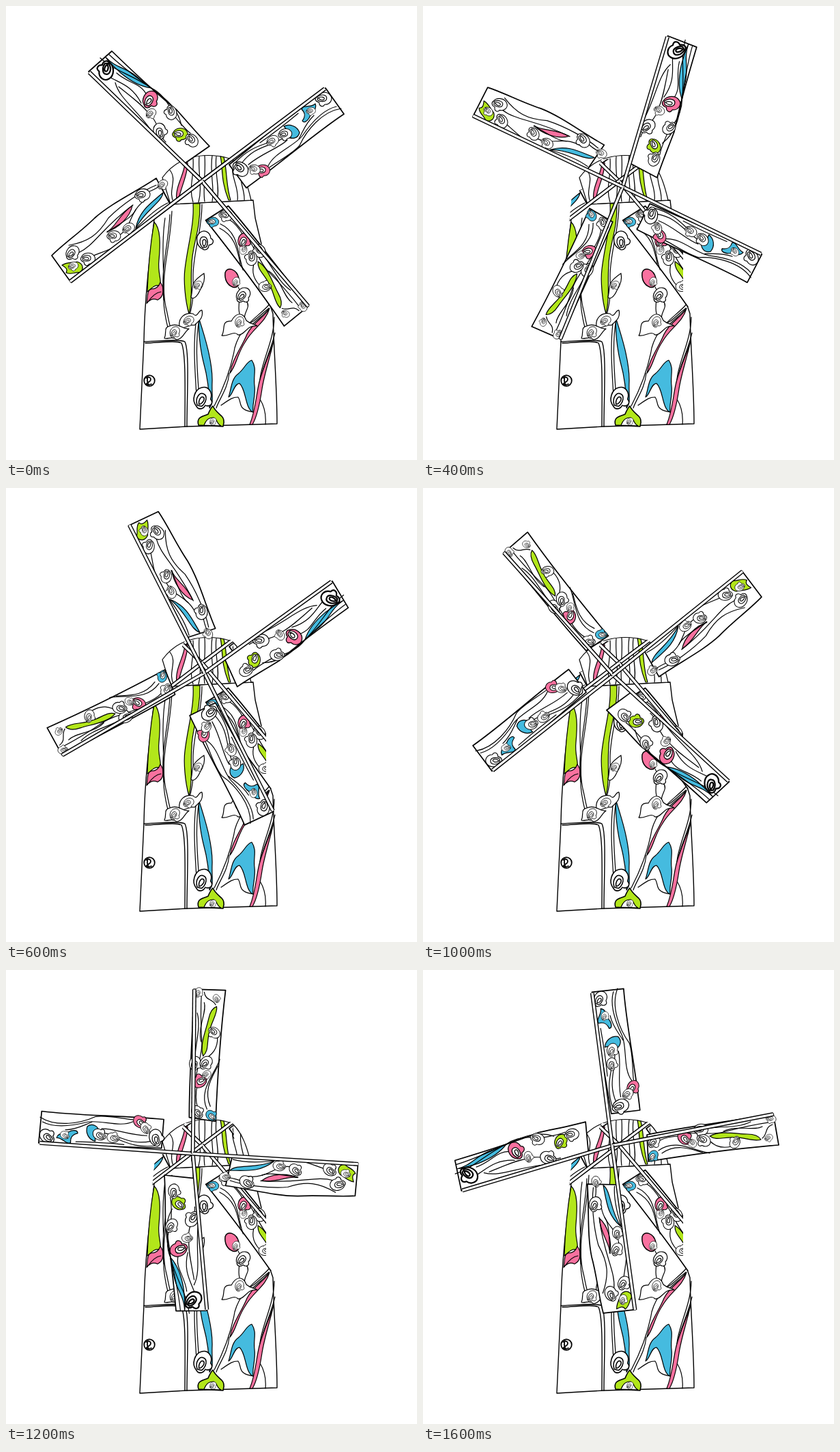
Write an HTML page that moves like this. It is 602 px wide and 664 px high and loops after 1800 ms.

```html
<!DOCTYPE html>
<html lang="en">
<head>
<meta charset="utf-8">
<title>Windmill</title>
<style>
html, body { margin: 0; width: 100%; height: 100%; overflow: hidden; background: #fff; }
svg { display: block; width: 602px; height: 664px; }
</style>
</head>
<body>
<svg id="stage" viewBox="0 0 602 664" stroke="#000" stroke-linecap="round" stroke-linejoin="round"></svg>
<script>
const GREEN = '#b2e61a', PINK = '#f8719f', BLUE = '#45bbdf', WHITE = '#fff';
const PIVOT = '282.7 264.8';
const STEP = 200;
const ANGLES = [0, 31, 62.7, 100.4, 139.5, 178.6, 220.9, 263.1, 299.4];

const shape = (d, fill = 'none', width = 1.2) =>
  `<path d="${d}" fill="${fill}" stroke-width="${width}"/>`;
const lines = (...paths) => paths.map(d => shape(d)).join('');

// A lily-like bloom: outer petal, white throat, small inner curl.
const bloom = (x, y, turn, size = 1, fill = WHITE, width = 1.2) =>
  `<g transform="translate(${x} ${y}) rotate(${turn}) scale(${size})">` +
  shape('M-7 8C-13 1-9-11-1-13C6-15 12-8 9 0C13 5 8 9 3 7C0 12-5 12-7 8Z', fill, width) +
  shape('M-6 7C-9-2-3-8 1-6C6-4 4 4-1 8Z', WHITE, width) +
  shape('M-4 6C-5 0-1-4 1-2S0 5-4 6', 'none', width) + '</g>';
const blooms = (...list) => list.map(args => bloom(...args)).join('');

const spar = (tip, hub) =>
  `<path d="M${tip}L${hub}" stroke-width="6" stroke-linecap="butt"/>` +
  `<path d="M${tip}L${hub}" stroke="#fff" stroke-width="3.2" stroke-linecap="butt"/>`;
const sail = (outline, tip, art, hub = '287 256') =>
  shape(outline, WHITE, 1.7) + art + spar(tip, hub);

const sailA = sail('M121 96L155 66C185 95 220 128 250 152C268 172 283 190 298 205L262 230C215 182 165 140 121 96Z', '122 97',
  shape('M146 75C160 90 175 90 190 102C202 112 207 116 213 120C195 118 180 108 168 98C160 90 152 84 146 75Z', BLUE) +
  lines('M138 76C160 96 180 98 213 120C225 126 235 138 241 150',
    'M152 104C165 112 185 116 198 142', 'M162 98C180 114 197 112 206 130',
    'M160 112C166 135 190 150 212 181', 'M165 118C185 134 200 145 208 156',
    'M215 122C235 136 252 150 257 175', 'M216 165C226 180 224 190 234 199',
    'M246 160C254 170 262 180 270 186', 'M151 71C175 94 200 110 220 126') +
  blooms([146, 93, 165, 1.1, WHITE, 2], [211, 138, 10, 1.05, PINK], [212, 158, 30, .65],
    [226, 184, -30, .95], [241, 155, 150, .85], [254, 188, 70, .9, GREEN], [271, 196, 120, .85]));

const sailB = sail('M468 120L495 158C450 188 405 228 352 266L327 232C372 196 420 155 468 120Z', '467 121',
  lines('M491 150C463 154 440 182 430 204C420 216 400 226 386 236',
    'M484 147C462 152 445 174 434 190C422 205 392 215 384 234',
    'M451 160C438 172 434 186 429 194', 'M408 192C385 207 365 204 345 230',
    'M398 194C380 204 360 202 334 231', 'M412 196C400 208 375 215 355 232',
    'M428 157C410 172 395 184 372 200', 'M455 130C462 124 468 130 470 138') +
  shape('M433 151C435 144 447 149 453 143C457 151 446 157 444 164C440 170 436 171 434 168C440 160 437 155 433 151Z', BLUE) +
  shape('M407 176C415 172 426 175 430 185C428 194 418 196 411 190C414 184 411 180 407 176Z', BLUE) +
  blooms([464, 136, 70, .95], [446, 154, 60, .55], [408, 188, 60, .8], [390, 198, 40, .75],
    [375, 241, 70, .85, PINK], [363, 239, 90, .7], [342, 238, 110, 1]));

// Drawn in its level pose, then turned to the rest pose.
const sailC = `<g transform="rotate(60.6 ${PIVOT})">` +
  sail('M513 210L521 256C460 261 405 268 330 280L328 241C390 228 450 222 513 210Z', '513 211',
    shape('M420 243C435 234 460 240 475 240C485 240 492 243 495 248C485 252 470 244 455 245C440 244 430 250 420 243Z', GREEN) +
    lines('M345 264C370 246 395 264 420 268', 'M350 268C372 253 392 262 410 267',
      'M349 245C380 233 420 243 440 237C470 229 490 225 512 222',
      'M412 242C425 257 435 262 452 258', 'M440 236C460 226 485 236 497 229',
      'M415 232C435 228 460 232 480 222', 'M497 246C505 240 500 230 512 226',
      'M345 250C352 246 365 243 378 243') +
    blooms([509, 218, 80, .6], [506, 246, 40, .5], [457, 251, 190, .75], [406, 234, 70, .85],
      [410, 249, 100, .85], [384, 246, -60, .9, PINK], [394, 253, 120, .55],
      [338, 252, 20, .8], [337, 273, 10, .7, BLUE]), '277 256.8') + '</g>';

const sailD = sail('M67 365L95 404C140 370 190 328 241 291L220 252C190 272 155 288 130 310C110 330 85 347 67 365Z', '94 403',
  shape('M148 330C160 325 165 305 185 292C182 308 165 325 148 330Z', PINK) +
  shape('M190 325C195 300 210 290 230 273C228 288 205 297 190 325Z', BLUE) +
  shape('M82 379C90 374 98 376 104 374C112 376 115 383 109 390C102 388 96 394 88 390C91 385 87 382 82 379Z', GREEN) +
  lines('M92 350C120 345 135 335 150 310C170 290 200 270 220 262',
    'M106 361C130 350 140 325 186 291', 'M112 372C140 358 170 355 189 328',
    'M168 334C185 322 180 300 205 283', 'M148 331C160 322 185 310 190 298',
    'M208 272C220 268 226 262 231 260', 'M190 326C205 310 220 296 237 288') +
  blooms([97, 362, 20, .9], [119, 370, 70, .85], [98, 381, 50, .6], [157, 337, 70, .8],
    [179, 326, 40, .75], [199, 277, 60, .9], [229, 262, 30, .65]));

const sails = sailA + sailB + sailC + sailD;

const cap =
  shape('M241 290L229 251C240 236 255 226 270 222C290 216 320 218 333 226C346 239 353 258 359 284Z', WHITE) +
  shape('M250 283C247 265 262 245 262 229L266 229C267 245 256 265 253 283Z', PINK) +
  shape('M314 220C318 235 314 255 326 284L329 284C322 262 324 240 319 221Z', GREEN) +
  lines('M240 240C252 255 236 270 246 288', 'M274 223C276 250 267 265 274 287', 'M283 220C281 245 288 265 282 287',
    'M291 219C293 245 288 265 291 286', 'M302 219C298 245 306 265 302 286',
    'M308 220C305 245 314 265 309 285', 'M333 227C327 248 342 265 339 284', 'M344 240C341 258 350 268 349 284');

const tower =
  shape('M217 313C210 370 203 430 202 490L196 619L265 615L397 611C397 560 392 500 391 450L385 432M240 290L362 284L365 310L374 348', 'none', 1.4) +
  shape('M217 316C227 325 226 350 224 372C222 390 228 400 226 410C218 405 212 415 207 418C208 385 212 345 217 316Z', GREEN) +
  shape('M226 404C232 412 232 425 222 430C214 426 208 432 206 435C208 425 206 415 213 414C220 414 224 410 226 404Z', PINK) +
  shape('M274 289L284 289C285 330 272 350 272 380C270 400 274 430 268 450C262 430 260 400 262 385C266 350 276 320 274 289Z', GREEN) +
  lines('M233 310C227 350 232 390 231 430C231 450 237 470 240 482',
    'M243 300C240 360 225 395 234 440C238 455 238 465 243 475',
    'M240 305C238 350 226 385 231 430M207 434C213 425 220 419 227 418',
    'M287 290C287 330 274 360 274 395C274 415 276 425 269 452',
    'M283 458C277 490 280 530 282 560', 'M278 465C274 500 277 535 279 570',
    'M386 436C370 455 345 465 335 500C330 530 318 560 305 585',
    'M327 537C325 560 312 575 308 588', 'M384 444C377 453 366 459 358 469',
    'M393 455C392 500 365 530 372 575C380 588 381 600 380 612',
    'M394 478C388 505 374 530 372 550', 'M340 411C347 420 338 435 342 450',
    'M352 432C360 440 346 450 350 458', 'M315 584C328 575 332 572 340 572C346 580 338 590 362 594',
    'M385 442C372 452 362 464 350 467') +
  shape('M283 458C290 480 303 520 302 550C301 570 305 580 298 588C298 570 296 545 289 520C284 500 281 470 283 458Z', BLUE) +
  shape('M326 572C330 560 330 545 340 538C350 530 352 520 360 518C368 530 362 540 364 555C366 570 360 585 362 594C350 590 352 560 342 552C334 552 332 570 326 572Z', BLUE) +
  shape('M386 442C380 454 362 462 353 480C345 500 332 515 328 537C338 525 338 510 350 492C362 470 380 464 386 442Z', PINK) +
  shape('M392 490C385 520 378 540 375 560C372 580 368 600 361 612L357 612C366 590 366 570 371 550C378 525 386 510 392 490Z', PINK) +
  shape('M321 390C324 380 338 385 341 398C344 408 338 413 332 411C324 408 320 400 321 390Z', PINK, 1.5) +
  shape('M316 482C322 474 314 460 330 461C338 446 348 449 352 460C360 467 364 464 368 468C352 466 350 482 340 481C334 474 325 484 316 482Z', WHITE) +
  shape('M271 426C275 410 268 406 290 391C292 400 288 410 284 416C280 425 274 430 271 426Z', WHITE) +
  shape('M254 470C252 455 262 448 274 450C280 458 282 444 287 445C290 458 280 462 276 467C268 464 262 474 254 470Z', WHITE) +
  shape('M232 486C236 478 230 470 240 468C252 462 260 474 268 472C260 478 260 486 250 488C242 482 238 488 232 486Z', WHITE) +
  blooms([337, 404, 0, .55], [347, 424, 20, .95], [342, 463, 0, .65], [281, 409, 25, .55],
    [291, 344, -25, 1.1], [267, 461, 40, .65], [247, 478, 10, .7], [288, 575, 0, 1.3]) +
  shape('M282 613C278 600 290 600 296 597C298 592 300 588 303 585C306 592 312 596 316 600C322 606 318 612 318 615Z', GREEN, 1.6) +
  shape('M290 613C293 606 296 602 304 602C310 604 308 611 315 614Z', WHITE) + bloom(303, 608, 20, .45) +
  shape('M202 491C225 490 255 487 262 491C269 505 265 570 265 615M204 493C228 492 250 489 257 493C264 508 262 570 262 615', 'none', 1.4) +
  '<circle cx="210" cy="548" r="7.8" fill="#fff" stroke-width="1.8"/>' +
  shape('M205 544C211 540 215 547 209 550S206 555 213 553M208 542C206 547 207 551 209 554', 'none', 1.8);

document.getElementById('stage').innerHTML =
  `<defs><g id="sails">${sails}</g><clipPath id="front">
    <path d="M214 320L218 276L242 262L262 224L332 222L336 262L374 282L381 345V420L390 440H290Z"/></clipPath></defs>
  ${tower}${cap}<use href="#sails" clip-path="url(#front)"/><use id="wheel" href="#sails"/>`;

const wheel = document.getElementById('wheel');
function draw() {
  const step = Math.floor(performance.now() / STEP) % ANGLES.length;
  wheel.setAttribute('transform', `rotate(${ANGLES[step]} ${PIVOT})`);
  requestAnimationFrame(draw);
}
draw();
</script>
</body>
</html>
```
